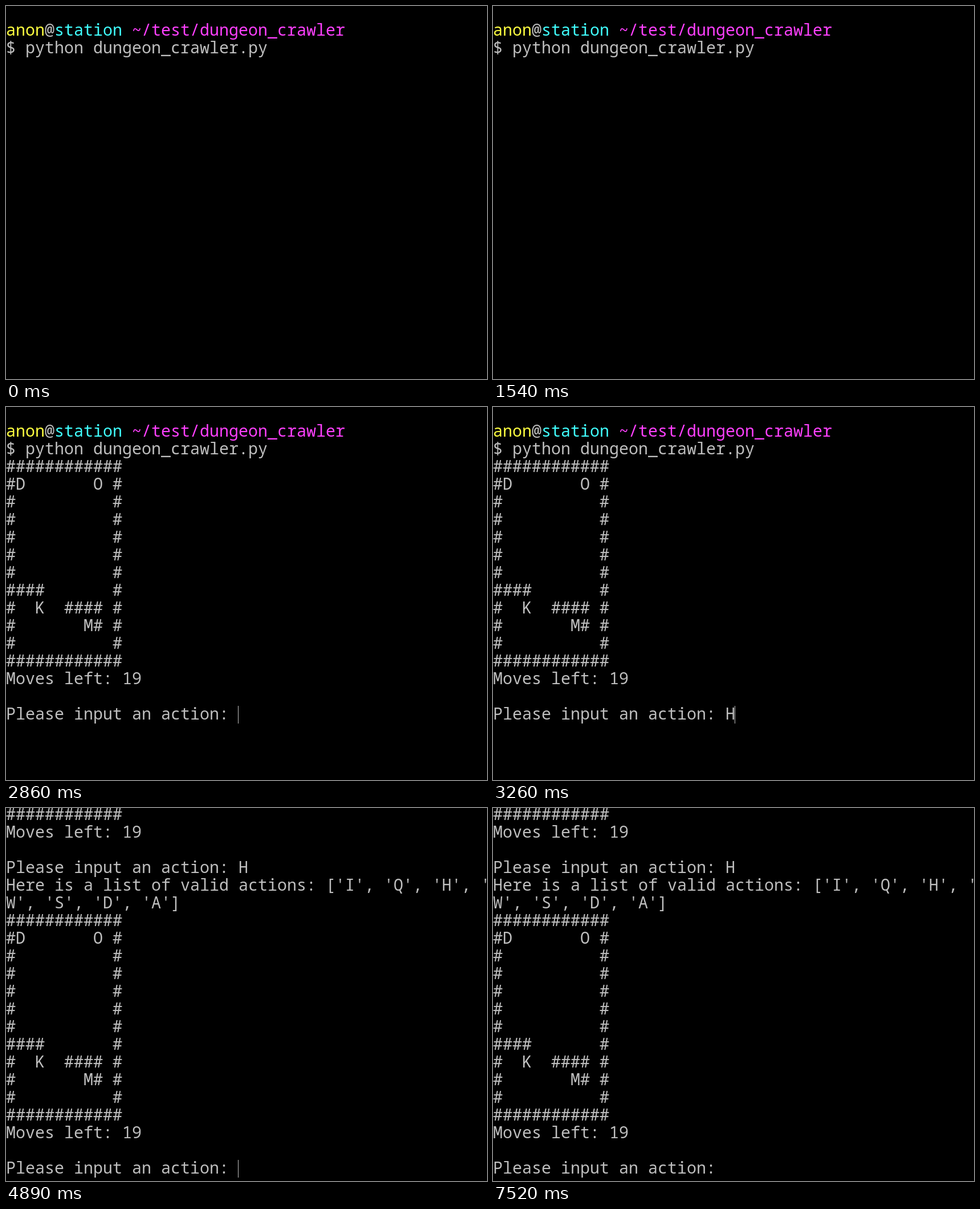
Write an HTML page that moves like this. It is 844 px wide and 654 px high and loops after 8 s.

```html
<!DOCTYPE html>
<html lang="en">
<head>
<meta charset="utf-8">
<title>Dungeon crawler terminal</title>
<style>
  html, body { margin: 0; width: 100%; height: 100%; overflow: hidden; background: #000; }
  svg { display: block; width: 844px; height: 654px; }
  text { font: 28.333px "Noto Sans Mono", "DejaVu Sans Mono", monospace; white-space: pre; fill: #bfbfbf; font-variant-ligatures: none; }
  .name { fill: #ffff40; }
  .host { fill: #40ffff; }
  .path { fill: #ff40ff; }
</style>
</head>
<body>
<svg viewBox="0 0 844 654">
  <g id="screen"><rect id="cursor" width="1" height="31" fill="#bfbfbf"/></g>
</svg>
<script>
const LOOP = 8000, COL = 17, ROW = 31, TOP = 28, BASELINE = 24;
const START = 1850, TYPED = 3260, REPLY = 4890, SCROLL_ROWS = 14;
const blinks = [110, 630, 1190, 1540, 1850, 2330, 2860, 3750, 4280, 4830,
                4890, 5390, 5940, 6430, 6990, 7520];

const board = [
  "############",
  "#D       O #",
  ...Array(5).fill("#          #"),
  "####       #",
  "#  K  #### #",
  "#       M# #",
  "#          #",
  "############",
  "Moves left: 19",
  "",
  "Please input an action: ",
];

const screen = document.getElementById("screen");
const cursor = document.getElementById("cursor");
const timed = [];

function addText(row, col, content, since = 0, color = "") {
  const node = document.createElementNS("http://www.w3.org/2000/svg", "text");
  node.setAttribute("x", col * COL);
  node.setAttribute("y", TOP + row * ROW + BASELINE);
  node.setAttribute("class", color);
  node.textContent = content;
  screen.append(node);
  timed.push({ node, since });
}

const addLines = (row, lines, since) =>
  lines.forEach((line, i) => addText(row + i, 0, line, since));

addText(0, 0, "anon", 0, "name");
addText(0, 4, "@");
addText(0, 5, "station", 0, "host");
addText(0, 13, "~/test/dungeon_crawler", 0, "path");
addText(1, 0, "$ python dungeon_crawler.py");
addLines(2, board, START);
addText(16, 24, "H", TYPED);
addLines(17, [
  "Here is a list of valid actions: ['I', 'Q', 'H', '",
  "W', 'S', 'D', 'A']",
  ...board,
], REPLY);

// Cursor cell as [row, column]
function cursorCell(t) {
  if (t >= REPLY) return [33, 24];
  if (t >= TYPED) return [16, 25];
  if (t >= START) return [16, 24];
  return [1, 28];
}

function draw(t) {
  for (const { node, since } of timed)
    node.setAttribute("visibility", t >= since ? "visible" : "hidden");
  const scroll = t >= REPLY ? SCROLL_ROWS * ROW : 0;
  screen.setAttribute("transform", `translate(0 ${-scroll})`);
  const [row, col] = cursorCell(t);
  cursor.setAttribute("x", col * COL - 1);
  cursor.setAttribute("y", TOP + row * ROW);
  const lit = blinks.filter(time => time <= t).length % 2 === 1;
  cursor.setAttribute("visibility", lit ? "visible" : "hidden");
}

function tick() {
  draw(performance.now() % LOOP);
  requestAnimationFrame(tick);
}
draw(0);
tick();
</script>
</body>
</html>
```
